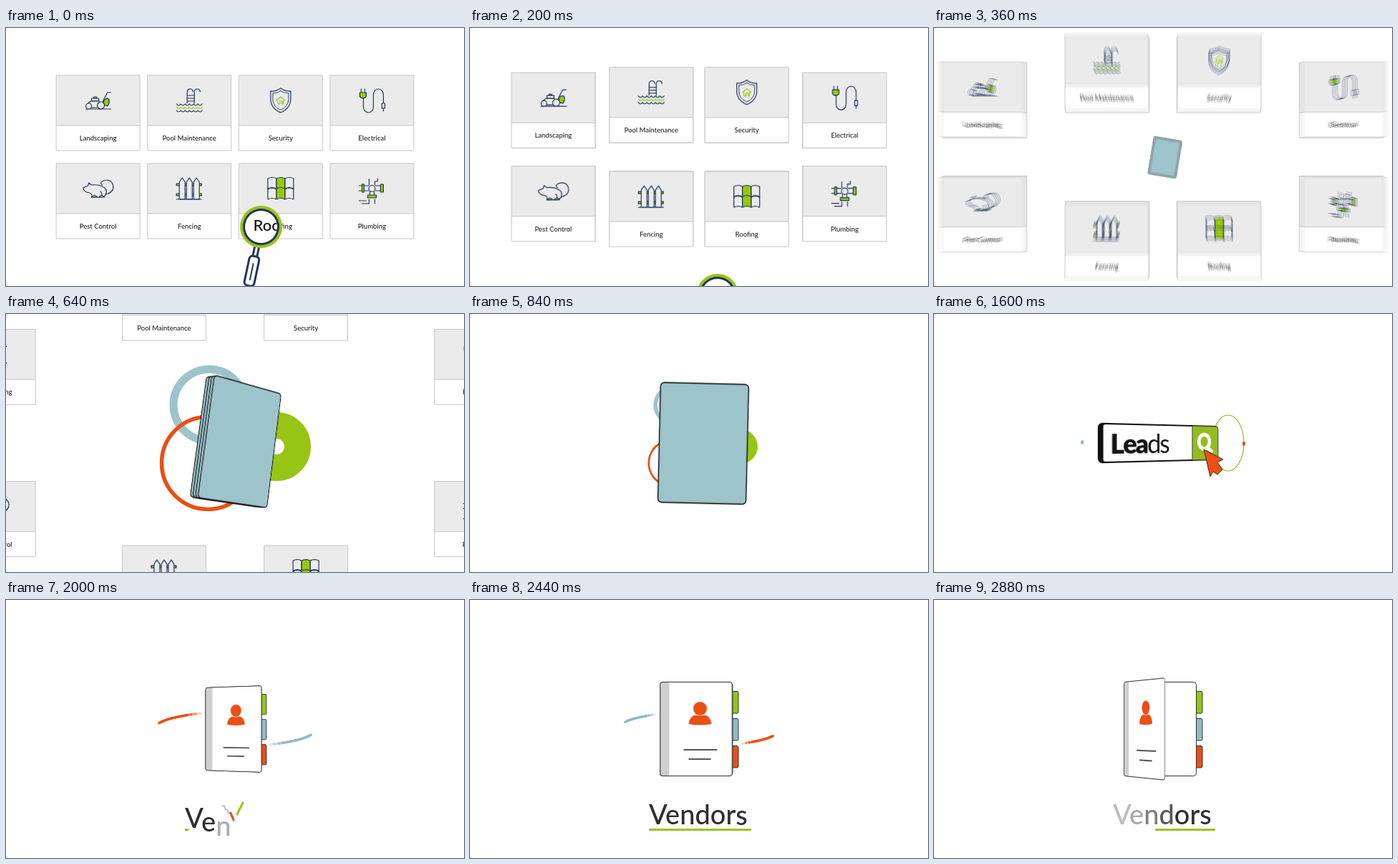
Animation, 640 px wide and 360 px high, one loop 2920 ms. Source, as an HTML page:

```html
<!DOCTYPE html>
<html lang="en">
<head>
<meta charset="utf-8">
<title>Services, leads, vendors</title>
<style>
html, body { margin: 0; width: 100%; height: 100%; overflow: hidden; background: #fff; }
#stage { position: relative; width: 640px; height: 360px; overflow: hidden; background: #fff; }
#stage svg { position: absolute; left: 0; top: 0; overflow: visible; }
.flat { width: 640px; height: 360px; }
.solid { width: 1px; height: 1px; transform-origin: 0 0; }
text { font-family: Lato, "Open Sans", sans-serif; }
.label { font-size: 9.5px; font-weight: 500; text-anchor: middle; fill: #222; }
.icon { fill: none; stroke: #22365a; stroke-width: 1.2; stroke-linecap: round; stroke-linejoin: round; }
.icon .g { fill: #98c80c; }
.icon .lime { stroke: #98c80c; }
.icon .w { fill: #ebebeb; }
</style>
</head>
<body>
<div id="stage"></div>
<script>
const LOOP = 2920, STEP = 40, GHOSTS = 4, SHEETS = 4, MID = 180;
const LIME = '#98c415', TEAL = '#9cc4ca', RED = '#ea4f14', NAVY = '#22365a', BLUE = '#93b9c6';
const stage = document.getElementById('stage');
const $ = id => document.getElementById(id);
const each = (n, f) => Array.from({ length: n }, (_, i) => f(i)).join('');
const add = (id, kind, body) => {
  stage.insertAdjacentHTML('beforeend', `<svg id="${id}" class="${kind}">${body}</svg>`);
  return $(id);
};
const put = (el, attrs) => { for (const k in attrs) el.setAttribute(k, attrs[k]); };
const show = (el, on) => { el.style.display = on ? '' : 'none'; };

// Progress from 0 to 1 between two times, and its eased forms.
const ramp = (t, a, b) => Math.min(1, Math.max(0, (t - a) / (b - a)));
const easeIn = (t, a, b, k = 2) => ramp(t, a, b) ** k;
const easeOut = (t, a, b, k = 2) => 1 - (1 - ramp(t, a, b)) ** k;
const smooth = (t, a, b) => (1 - Math.cos(Math.PI * ramp(t, a, b))) / 2;
const sinDeg = a => Math.sin(a * Math.PI / 180);
const cosDeg = a => Math.cos(a * Math.PI / 180);

const line = (d, cls = '') => `<path class="${cls}" d="${d}"/>`;
const box = (x, y, w, h, cls = '') => `<rect class="${cls}" x="${x}" y="${y}" width="${w}" height="${h}"/>`;
const disc = (x, y, r, cls = 'w') => `<circle class="${cls}" cx="${x}" cy="${y}" r="${r}"/>`;
const ripples = (y, cls) => line(`M-18 ${y}` + 'q3 4 6 0'.repeat(6), cls);
const rail = x => line(`M${x} 4v-15q0-5 4-5t4 4`);
const shield = k => `<g transform="scale(${k})">${line('M0-17q7 5 14 4v11q0 13-14 19q-14-6-14-19v-11q7 1 14-4z')}</g>`;
const picket = x => line(`M${x} 15v-24l4-6 4 6v24z`, 'w');
const tile = (x, cls) => [-14, 0].map(y => line(`M${x} ${y}q6-3 12 0v15q-6-3-12 0z`, cls)).join('');

const services = {
  'Landscaping': line('M-17 12h35M-9 10h9M-14 4l4-3h11l4 4 8-16h5') + box(-9, -3, 10, 4) + box(-6, -5, 4, 2)
    + line('M8 0q4-4 7-2 2 6-2 10l-5-2z', 'g') + disc(-13, 8, 4) + disc(4, 7, 5),
  'Pool Maintenance': rail(-3) + rail(7) + line('M-3-7h10M-3-3h10M-3 1h10')
    + ripples(5) + ripples(9.5, 'lime') + ripples(14),
  'Security': shield(1) + shield(.78) + line('M-6 0l6-5 6 5M-4 0v5h3v-4h3v4h2v-5', 'lime'),
  'Electrical': line('M-17-11h9v5q-1 3-4.500 3t-4.500-3zM-15-11v-5M-10-11v-5', 'g')
    + line('M-12-3V9a7 8 0 0 0 14 0V-8a7 8 0 0 1 14 0V4') + box(14, 4, 4, 7, 'w') + line('M16 11v4'),
  'Pest Control': line('M-21-1l7-3 1-4 4 3q9-1 15 2q8 3 5 11q-2 4-8 4H-9q2-4-3-6q-8-1-9-7z', 'w')
    + line('M11 8q12-3 10-13q-3-9-13-6q-7 3-2 6M3 4q3 1 2 7')
    + [-9, 1].map(x => line(`M${x} 12q4-5 8 0z`, 'g')).join(''),
  'Fencing': box(-18, -7, 35, 3, 'g') + box(-18, 7, 35, 3, 'g') + [-14, -4, 6].map(picket).join('') + line('M-18 15h35'),
  'Roofing': tile(-18) + tile(6) + tile(-6, 'g'),
  'Plumbing': line('M-18-4h13M5-4h10M-18 3h13M5 3h10M-4-5v-8M4-5v-5h4v-4M-4 15v6h-10M4 15v6M-18 17h10M-3 4v5M3 4v5')
    + disc(0, 0, 4.5) + box(-14, -6, 3, 11, 'g') + box(12, -6, 4, 11, 'g') + box(-6, 9, 12, 4, 'g')
};
const names = Object.keys(services);

const cardArt = (name, i) => `<g id="card${i}" transform="translate(-58.500 -52.500)">
  <rect width="117" height="105" fill="#fff"/><rect width="117" height="70" fill="#ebebeb"/>
  <path d="M0 0h117v105H0zM0 70h117" fill="none" stroke="#c6c6c6"/>
  <g class="icon" transform="translate(58.500 35)">${services[name]}</g>
  <text class="label" x="58.500" y="91">${name}</text></g>`;

add('board', 'flat', `<defs>${names.map(cardArt).join('')}
  <clipPath id="lens"><circle r="22.500"/></clipPath></defs>
  ${names.map((_, i) => each(GHOSTS, k => `<use id="u${i}_${k}" href="#card${i}" opacity="${1 / (k + 1)}"/>`)).join('')}
  <g id="glass">
    <g fill="#fff" stroke="${NAVY}" stroke-width="3" transform="rotate(12)">
      <path d="M-3 26v16M3 26v16"/><rect x="-7" y="42" width="14" height="42" rx="5"/><path d="M0 52v24" stroke-width="2"/>
    </g>
    <circle r="29.500" fill="${LIME}"/><circle r="25.500" fill="${NAVY}"/><circle r="22.500" fill="#fff"/>
    <text x="-11" y="5.500" font-size="22" font-weight="500" fill="#111" clip-path="url(#lens)">Roofing</text>
  </g>`);

const rings = [
  { x: 284, y: 127, r: 50, w: 11, color: TEAL },
  { x: 282, y: 208, r: 64.5, w: 5.5, color: RED },
  { x: 378, y: 185, r: 29.5, w: 37, color: LIME }
];
add('rings', 'flat', rings.map((c, i) =>
  `<circle id="ring${i}" cx="${c.x}" cy="${c.y}" fill="none" stroke="${c.color}"/>`).join(''));

add('back', 'flat', '<g id="trailBack" stroke-width="3.500" stroke-linecap="round"></g>');

// Built from the rearmost sheet forward.
const sheets = Array.from({ length: SHEETS }, (_, i) => add('sheet' + i, 'solid',
  `<rect x="-61.500" y="-83.500" width="123" height="167" rx="5" fill="${TEAL}"/>`));

const page = add('page', 'solid', `
  <rect x="-61.500" y="-84.500" width="123" height="169" rx="4" fill="#fff" stroke="#222" stroke-width="1.300"/>
  <g fill="none" stroke="#35507c" stroke-width="1.100"><circle cx="-36.500" cy="-50" r="13.500"/><circle cx="-36.500" cy="1" r="10.500"/>
  <path d="M-38-66l2 4 2-3"/></g>
  ${each(4, i => `<path id="row${i}" stroke="#222"/>`)}
  <path id="nib" d="M-12-56.500h9" stroke="${RED}"/>`);

add('ripple', 'flat', `<ellipse id="wave" cx="411" cy="180" fill="none" stroke="#8fb52c" stroke-width="1.200"/>`);

const letters = word => [...word].map(c => `<tspan>${c}</tspan>`).join('');
const bar = add('bar', 'solid', `
  <rect x="-90" y="-26" width="180" height="52" rx="6" fill="#111"/>
  <rect x="-83" y="-24" width="172" height="48" rx="3" fill="#fff"/>
  <path d="M46-25h40q4 0 4 4v42q0 4-4 4h-40z" fill="#94bb20" stroke="#333"/>
  <g fill="none" stroke="#fff" stroke-width="5.500"><ellipse cx="66" cy="-2" rx="9" ry="10.500"/><path d="M69 5l11 9"/></g>
  <text id="leads" x="-74" y="14" font-size="36" letter-spacing="-2" fill="#111">${letters('Leads')}</text>`);

add('pointer', 'flat', `<path id="cursor" d="M0 0l27 14-8 4 7 10-7 7-6-4-4 7z" fill="${RED}" stroke="#4a2a1a"/>`);

const tab = (color, i) => `<rect x="46" y="${38 * i - 52.5}" width="13" height="30.500" rx="2" fill="${color}" stroke="#333"/>`;
const book = add('book', 'solid', `${[LIME, BLUE, RED].map(tab).join('')}
  <rect x="-50.500" y="-65.500" width="101" height="131" rx="4" fill="#fff" stroke="#333"/>`);
const cover = add('cover', 'solid', `
  <rect y="-65.500" width="101" height="131" rx="4" fill="#fff"/>
  <rect y="-65.500" width="13" height="131" rx="3" fill="#cfcfcf"/>
  <rect y="-65.500" width="101" height="131" rx="4" fill="none" stroke="#333" stroke-width="1.100"/>
  <g fill="${RED}"><circle cx="56" cy="-28.500" r="9.600"/><path d="M40-7q1-11 10-12.500q6 2 12 0q9 1.500 10 12.500q-16 3-32 0z"/></g>
  <path d="M33 29h47M40 42h31" stroke="#222" stroke-width="1.700"/>`);

add('front', 'flat', `<g id="trailFront" stroke-width="3.500" stroke-linecap="round"></g>
  <text id="word" x="250" y="313" font-size="38" font-weight="500" fill="#2e2e33">${letters('Vendors')}</text>
  <path id="rule" stroke="${LIME}" stroke-width="3"/>
  <g id="sparks" fill="none" stroke-width="3" stroke-linecap="round">
    <path d="M-14-13${'l4 1 0 4'.repeat(4)}" stroke="${BLUE}" stroke-width="1.500"/>
    <path d="M-2-3l4 10" stroke="${RED}"/><path d="M7-1l8-16" stroke="${LIME}"/></g>`);

const pose = (el, x, y, depth, turn) => {
  el.style.transform = `translate(${x}px,${y}px) perspective(${depth}px) ${turn}`;
};

// Outer columns are pushed sideways, inner ones up and down.
function drawBoard(t) {
  const p = Math.max(0, (t - 160) / 204);
  const blur = .11 * Math.sin(Math.PI * ramp(t, 180, 580));
  names.forEach((_, i) => {
    const col = i % 4 - 1.5, row = i < 4 ? -1 : 1, outer = Math.abs(col) > 1;
    const dx = Math.sign(col) * (outer ? 62 : 15), dy = row * (outer ? 19 : 57);
    for (let k = 0; k < GHOSTS; k++) {
      const q = p + blur * (k / (GHOSTS - 1) - .5), u = $(`u${i}_${k}`);
      put(u, { transform: `translate(${320 + 127.6 * col + dx * q} ${MID + 61.5 * row + dy * q})` });
      show(u, !k || blur > .01);
    }
  });
  show($('board'), t < 1000);
  const m = easeIn(t, 0, 240, 1.5);
  put($('glass'), { transform: `translate(${356.5 - 14 * m} ${277.5 + 125 * m})` });

  const grow = easeOut(t, 400, 640) * (1 - smooth(t, 720, 960));
  rings.forEach((c, i) => put($('ring' + i), { r: c.r * grow, 'stroke-width': c.w * grow }));
}

function drawPages(t) {
  const swing = 40 * Math.sin(2 * Math.PI * (Math.min(1080, Math.max(360, t)) - 360) / 960);
  const roll = 9.5 - 19 * smooth(t, 640, 1080);
  const size = ramp(t, 240, 640), soft = 1 - ramp(t, 360, 480);
  const away = ramp(t, 1080, 1320);
  const x = 329 - 7 * smooth(t, 640, 1080);
  sheets.forEach((el, i) => {
    const z = -6 * (SHEETS - 1 - i);
    show(el, t > 280 && t < 1320);
    pose(el, x - 9 * (1 - size), MID + .5, 1000,
      `rotateY(${swing - 50 * away}deg) rotateZ(${roll * (1 - away)}deg) scale(${size}) translateZ(${z}px)`);
    put(el.firstElementChild, { 'stroke-width': 1.3 + 11 * soft, stroke: soft > .5 ? '#8fa5a8' : '#111' });
  });

  const flip = swing + 130 * easeIn(t, 1080, 1360, 1.3);
  show(page, t >= 880 && t < 1360);
  page.style.opacity = ramp(t, 840, 960);
  pose(page, 321, MID + .5, 900,
    `rotateY(${flip}deg) rotateZ(${roll * (1 - ramp(t, 880, 1080))}deg) scale(1,${1 - .65 * ramp(t, 1240, 1360)})`);
  for (let i = 0; i < 4; i++) {
    const low = i > 1, left = low ? -17 : -12, wide = low ? 44 : 57;
    const y = (low ? -2.5 : -56.5) + (i % 2) * (low ? 10 : 14);
    put($('row' + i), { d: `M${left} ${y}h${wide * ramp(t, 920 + 20 * i, 1020 + 20 * i)}` });
  }
  show($('nib'), t >= 960 && t < 1160);
}

function drawBar(t) {
  const turn = 22 + 68 * (1 - easeOut(t, 1360, 1600)) - 112 * easeIn(t, 1600, 1800);
  show(bar, t > 1360 && t < 1800);
  pose(bar, 320, MID, 400, `rotateY(${turn}deg)`);
  [...$('leads').children].forEach((c, i) => {
    c.style.fontWeight = t >= 1480 + i * 45 ? 900 : 400;
    c.style.opacity = t >= 1360 + i * 24 ? 1 : 0;
  });
  const wave = Math.max(0, (t - 1480) / 120);
  put($('wave'), { rx: 22 * wave, ry: 39 * wave });
  show($('wave'), wave > 0 && t < 1680);
  const near = easeOut(t, 1440, 1560) * (1 - easeIn(t, 1680, 1760));
  put($('cursor'), { transform: `translate(${407 - 30 * near} ${227 - 38 * near}) scale(${near})` });
}

// Two strokes circle the book; their upper halves pass behind it.
function drawTrails(t) {
  const parts = { trailBack: '', trailFront: '' }, N = 12;
  const head = -.4 * (t - 1600), length = 48 * Math.sin(Math.PI * ramp(t, 1560, 2720));
  const spot = a => [320 + 113 * cosDeg(a), MID + 24 * sinDeg(a)];
  if (length > .01) [RED, BLUE].forEach((color, n) => {
    for (let i = 0; i < N; i++) {
      const a = head + 180 * n + length * i / N;
      parts[sinDeg(a) < 0 ? 'trailBack' : 'trailFront'] +=
        `<path d="M${spot(a)}L${spot(a + length / N)}" stroke="${color}" opacity="${Math.min(1, (N - i) / 4)}"/>`;
    }
  });
  for (const id in parts) $(id).innerHTML = parts[id];
}

function drawBook(t) {
  const settle = easeOut(t, 1800, 2280);
  const size = .8 + .2 * Math.sin(Math.PI / 2 * ramp(t, 1800, 2400));
  const turn = `rotateY(${-90 * (1 - settle)}deg) scale(${size})`;
  const x = 319 - 3 * settle;
  show(book, t > 1800);
  show(cover, t > 1800);
  pose(book, x, MID, 1050, turn);
  pose(cover, x, MID, 1050, `${turn} translateX(-50.5px) rotateY(${-56 * easeIn(t, 2700, 2880, 3)}deg)`);
}

function drawWord(t) {
  let last = 0;
  [...$('word').children].forEach((c, i) => {
    const born = 1850 + 60 * i, gone = 2720 + 40 * i;
    const y = 20 * (1 - easeOut(t, born, born + 300));
    const alpha = ramp(t, born, born + 75) * (1 - .68 * ramp(t, gone, gone + 140));
    put(c, { dy: y - last, 'fill-opacity': alpha });
    last = y;
  });
  const from = 250 + 59 * easeIn(t, 2740, 2880), to = 250 + 143 * smooth(t, 1960, 2280);
  put($('rule'), { d: `M${from} 320.500H${to}` });
  put($('sparks'), { transform: `translate(${316 + .34 * (t - 2000)} 300)` });
  show($('sparks'), t >= 1880 && t < 2200);
}

const start = performance.now();
function frame(now) {
  const t = Math.floor(Math.max(0, now - start) % LOOP / STEP) * STEP;
  [drawBoard, drawPages, drawBar, drawTrails, drawBook, drawWord].forEach(draw => draw(t));
  requestAnimationFrame(frame);
}
frame(start);
</script>
</body>
</html>
```
